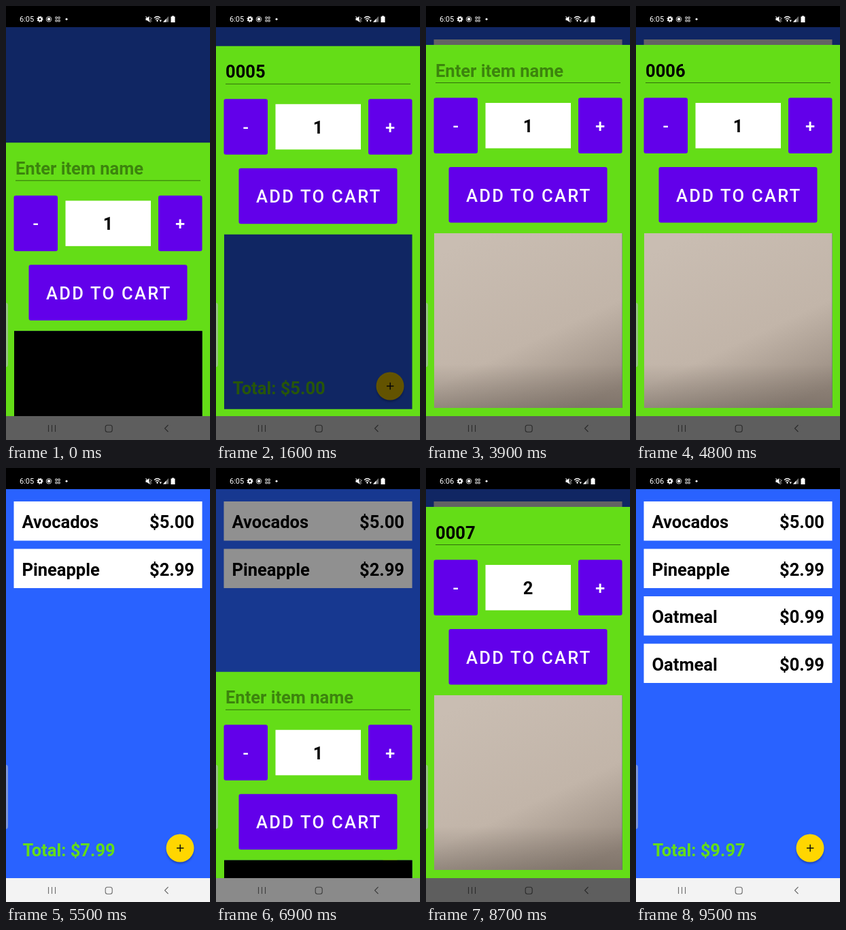
An HTML page for the animation above (9800 ms loop, 300 by 636 pixels).

```html
<!DOCTYPE html>
<html lang="en">
<head>
<meta charset="utf-8">
<title>Shopping cart</title>
<style>
  html, body { margin: 0; width: 100%; height: 100%; overflow: hidden; background: #000; }
  svg { display: block; width: 100%; height: 100%; }
  text { font: 700 25.5px Roboto, sans-serif; white-space: pre; }
  .end { text-anchor: end; }
  .mid { text-anchor: middle; }
  .button rect { fill: #6200ea; }
  .button text { fill: #fff; font-weight: 500; text-anchor: middle; }
</style>
</head>
<body>
<svg viewBox="0 0 300 636" xmlns="http://www.w3.org/2000/svg">
  <defs>
    <clipPath id="content"><rect y="31" width="300" height="570"/></clipPath>
    <clipPath id="fabShape"><circle cx="256" cy="557" r="20.5"/></clipPath>
    <linearGradient id="paper" x1=".25" y1="0" x2=".75" y2="1">
      <stop offset="0" stop-color="#c9bdb2"/>
      <stop offset=".6" stop-color="#c2b5a9"/>
      <stop offset="1" stop-color="#988b80"/>
    </linearGradient>
    <linearGradient id="shade" x1="0" y1="0" x2="0" y2="1">
      <stop offset=".75" stop-color="#5c534c" stop-opacity="0"/>
      <stop offset="1" stop-color="#5c534c" stop-opacity=".4"/>
    </linearGradient>
    <filter id="soft" x="-20%" y="-20%" width="140%" height="150%"><feGaussianBlur stdDeviation="1.5"/></filter>
  </defs>

  <rect y="31" width="300" height="570" fill="#2962ff"/>
  <g id="rows"></g>
  <text id="total" x="24.5" y="569" fill="#64dd17"></text>
  <circle cx="256" cy="559.5" r="20" fill="#0b2a86" opacity=".6" filter="url(#soft)"/>
  <circle cx="256" cy="557" r="20.5" fill="#ffd600"/>
  <circle id="ripple" cx="253" cy="557" fill="#c4a508" clip-path="url(#fabShape)"/>
  <path d="M251 557h10.4M256.2 551.8v10.4" stroke="#111" stroke-width="1.5"/>
  <rect class="dim" y="31" width="300" height="570"/>

  <g clip-path="url(#content)">
    <g id="sheet">
      <path fill="#64dd17" fill-rule="evenodd" d="M0 0H300V546H0ZM12 276V532H288.500V276Z"/>
      <rect id="camera" x="12" y="276" width="276.5" height="256"/>
      <rect id="cameraShade" x="12" y="276" width="276.5" height="256" fill="url(#shade)"/>
      <text id="field" x="14" y="46.5"></text>
      <path d="M14 55.5H286" stroke="#000" stroke-opacity=".5"/>
      <g class="button">
        <rect x="11.5" y="77.5" width="64.5" height="81.5" rx="3"/><text x="43.7" y="128">-</text>
        <rect x="224" y="77.5" width="64.5" height="81.5" rx="3"/><text x="256.2" y="128">+</text>
        <rect x="33.5" y="179" width="233" height="81.5" rx="3"/>
        <text x="151.3" y="229.5" letter-spacing="2.28">ADD TO CART</text>
      </g>
      <rect x="87.5" y="85" width="125.5" height="66.5" fill="#fff"/>
      <text id="quantity" class="mid" x="150" y="128"></text>
    </g>
  </g>

  <rect y="601" width="300" height="35" fill="#f3f3f3"/>
  <g fill="none" stroke="#6c6c6c" stroke-width="1.1">
    <path d="M62.5 614v10M67.5 614v10M72.5 614v10M238.5 614l-5 5 5 5"/>
    <rect x="146.2" y="614.2" width="10" height="10" rx="3"/>
  </g>
  <rect class="dim" y="601" width="300" height="35"/>
  <path d="M0 435q3 0 3 4v86q0 4-3 4z" fill="#b0b4c0" opacity=".62"/>

  <rect width="300" height="31" fill="#000"/>
  <text id="clock" x="20" y="23" fill="#fff" style="font-size:11px;font-weight:400"></text>
  <g fill="none" stroke="#fff">
    <circle cx="50" cy="19.3" r="2.5" stroke-width="2"/>
    <circle cx="50" cy="19.3" r="3.9" stroke-width="1.3" stroke-dasharray="1.5 1.56"/>
    <circle cx="63" cy="19.3" r="3.8" stroke-width=".8"/>
    <path d="M72.8 16h2.4v2.4h-2.4zM76.8 16h2.4v2.4h-2.4zM72.8 20.4h2.4v2.4h-2.4zM76.8 20.4h2.4v2.4h-2.4z" stroke-width=".8"/>
    <path d="M205.5 15l7 9M212 16.5l2 2-2 2 2 2" stroke-width="1"/>
    <path d="M218 17.5q4.5-4 9 0M219.8 19.5q2.7-2.4 5.4 0" stroke-width="1.2"/>
  </g>
  <g fill="#fff">
    <circle cx="63" cy="19.3" r="2.2"/>
    <circle cx="89" cy="19.3" r="1.5"/>
    <path d="M205.5 17.5h2l3-2.5v8.5l-3-2.5h-2zM221 21l1.5-1 1.5 1-1.5 2.5zM225.5 20.5h3.5l-1.7 3z"/>
    <path d="M231 23.5l8-8.5v8.5z" opacity=".45"/>
    <path d="M231 23.5l4.5-4.8v4.8z"/>
    <path d="M242.5 15.5h1.5v-1h3v1h1.5v8.5h-6z"/>
  </g>
</svg>

<script>
const LOOP = 9800, STEP = 100, SHEET_TOP = 57, SHEET_TRAVEL = 544;
const OPEN_MS = 300, CLOSE_MS = 350, DIM = 0.61;

// Each visit: FAB tap, sheet opening, code scanned, sheet closing.
const visits = [
  { tap: -400, open: -146, scan: 1000, close: 1580, code: '0005' },
  { tap: 3000, open: 3200, scan: 4500, close: 4980, code: '0006' },
  { tap: 6600, open: 6800, scan: 7600, close: 8980, code: '0007', double: 8400 }
];
const items = [
  { name: 'Avocados', price: 5, visit: 0 },
  { name: 'Pineapple', price: 2.99, visit: 1 },
  { name: 'Oatmeal', price: 0.99, visit: 2 },
  { name: 'Oatmeal', price: 0.99, visit: 2 }
];

const $ = id => document.getElementById(id);
const clamp = v => Math.min(1, Math.max(0, v));
const progress = (t, start, length) => clamp((t - start) / length);
const money = v => '$' + v.toFixed(2);

$('rows').innerHTML = items.map(({ name, price }, i) => `
  <g transform="translate(0 ${49 + i * 69.5})">
    <rect x="11.5" width="277" height="57.5" fill="#fff"/>
    <text x="23.5" y="39">${name}</text>
    <text class="end" x="277" y="39">${money(price)}</text>
  </g>`).join('');
const rows = [...$('rows').children];
const dims = document.querySelectorAll('.dim');

function drawList(t) {
  let total = 0;
  items.forEach(({ price, visit }, i) => {
    const { close } = visits[visit];
    if (t >= close) total += price;
    rows[i].setAttribute('opacity', progress(t, close + 320, 200));
  });
  $('total').textContent = 'Total: ' + money(total);
}

function drawSheet(t, visit) {
  const { open, scan, close, code, double } = visit;
  const rise = 1 - (1 - progress(t, open, OPEN_MS)) ** 2;
  const fall = progress(t, close, CLOSE_MS) ** 2;
  const y = SHEET_TOP + SHEET_TRAVEL * (1 - rise + fall);
  $('sheet').setAttribute('transform', `translate(0 ${y})`);

  const dim = DIM * progress(t, open, 140) * (1 - progress(t, close + 120, 300));
  dims.forEach(d => d.setAttribute('opacity', dim));

  const live = t >= open + 500;
  const shown = t < close;
  $('camera').setAttribute('fill', !shown ? 'none' : live ? 'url(#paper)' : '#000');
  $('cameraShade').setAttribute('opacity', live && shown ? 1 : 0);

  const scanned = t >= scan;
  $('field').textContent = scanned ? code : 'Enter item name';
  $('field').setAttribute('fill-opacity', scanned ? 1 : 0.4);
  $('quantity').textContent = double && t >= double ? 2 : 1;
}

function draw(t) {
  const visit = visits.filter(v => t >= v.tap).pop();
  const sinceTap = t - visit.tap;
  drawList(t);
  drawSheet(t, visit);
  $('ripple').setAttribute('r', sinceTap < 300 ? 18 + sinceTap / 20 : 0);
  $('clock').textContent = t < 7000 ? '6:05' : '6:06';
}

const started = performance.now();
function tick() {
  const t = (performance.now() - started) % LOOP;
  draw(Math.floor(t / STEP) * STEP);
  requestAnimationFrame(tick);
}
tick();
</script>
</body>
</html>
```
